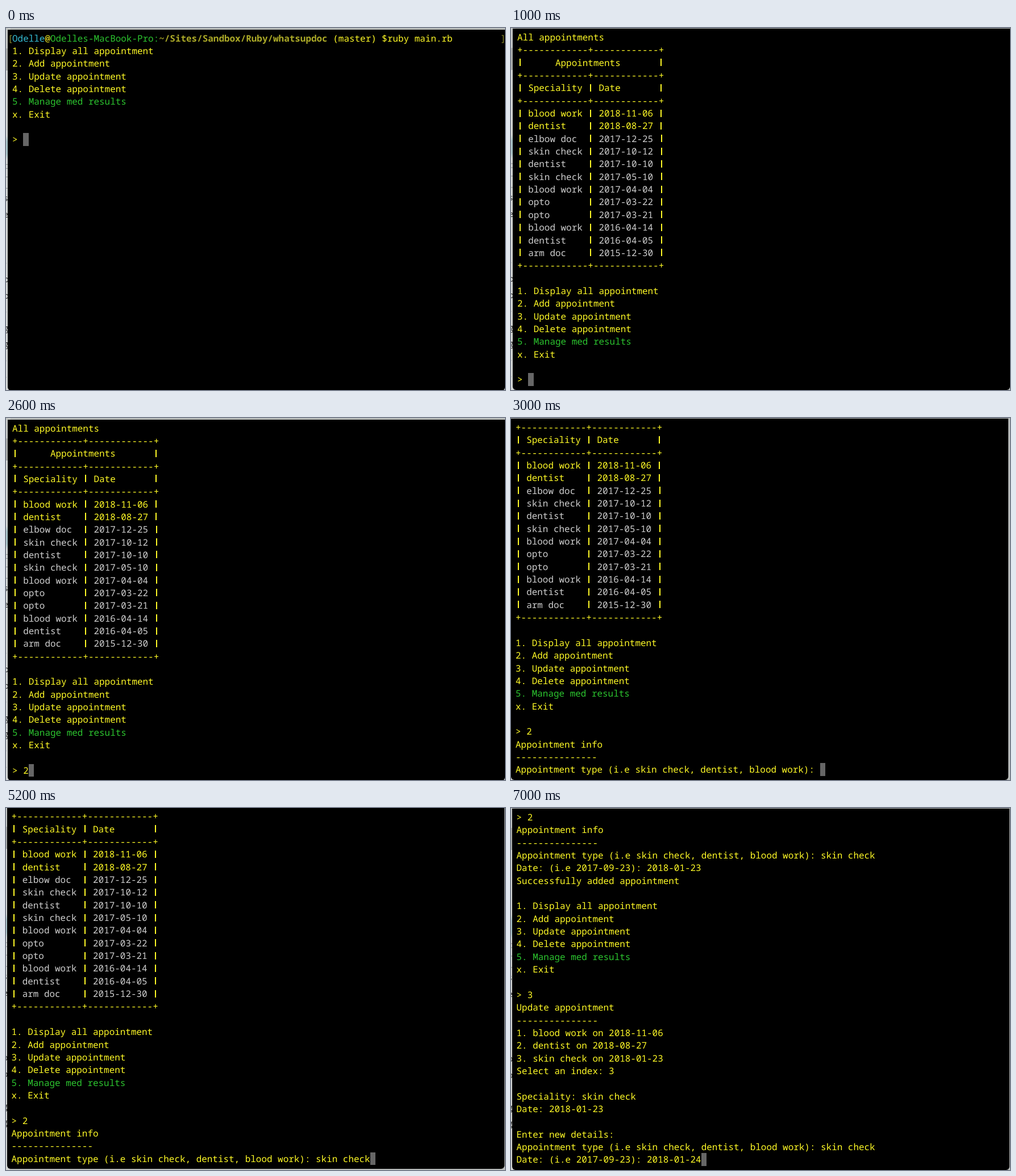
An HTML page for the animation above (8 s loop, 878 by 638 pixels).

```html
<!DOCTYPE html>
<html lang="en">
<head>
<meta charset="utf-8">
<title>Appointment terminal</title>
<style>
html, body { margin: 0; width: 100%; height: 100%; overflow: hidden; }
#stage { position: relative; width: 878px; height: 638px; overflow: hidden; background: #b9bcbb; }
#desk { position: absolute; left: 0; top: 0; width: 8px; height: 642px;
  background: linear-gradient(#c4c7c6 36px, #a9acab 36px 75px, #d3d6d5 75px 190px, #a9c3c8 200px 222px, #d3d6d5 232px); }
#desk span { position: absolute; left: -4px; font: 15px/20px "Open Sans", sans-serif; color: #222; }
#desk hr { position: absolute; left: 0; width: 8px; height: 1px; margin: 0; border: 0; background: #8d9090; }
#win { position: absolute; width: 875px; height: 636.5px; background: #000; border-radius: 0 0 6px 6px; }
pre { position: absolute; left: 8px; top: 4px; margin: 0; color: #fffa26;
  font: 500 15.95px/22.35px "Noto Sans Mono", monospace; text-rendering: geometricPrecision; }
.green { color: #2cc52f; }
.cyan { color: #35bcd4; }
.gray { color: #cfcfcf; }
.path { color: #acaa28; font-weight: 700; }
.mark { position: absolute; top: 0; color: #8b8a2c; font-weight: 400; }
.bar { -webkit-text-fill-color: transparent;
  background: linear-gradient(currentColor, currentColor) center / 2px 13px no-repeat; }
.cursor { display: inline-block; vertical-align: top; width: 9.57px; height: 22.35px; background: #666; }
</style>
</head>
<body>
<div id="stage">
  <div id="desk"></div>
  <div id="win"><pre id="text"></pre></div>
</div>
<script>
const $ = id => document.getElementById(id);
const tint = (name, s) => `<span class="${name}">${s}</span>`;
const mark = (s, x) => `<span class="mark" style="left:${x}px">${s}</span>`;
const rule = `+${"-".repeat(12)}+${"-".repeat(12)}+`;
const dashes = "-".repeat(15);

const shell = mark("[", -8) + mark("]", 859) +
  tint("cyan", "Odelle") + "@" + tint("green", "Odelles-MacBook-Pro:") +
  tint("path", "~/Sites/Sandbox/Ruby/whatsupdoc") + " (master) $ruby main.rb";

const menu = ["1. Display all appointment", "2. Add appointment", "3. Update appointment",
  "4. Delete appointment", tint("green", "5. Manage med results"), "x. Exit", ""];

const visits = `blood work 2018-11-06,dentist 2018-08-27,elbow doc 2017-12-25,skin check 2017-10-12,
dentist 2017-10-10,skin check 2017-05-10,blood work 2017-04-04,opto 2017-03-22,opto 2017-03-21,
blood work 2016-04-14,dentist 2016-04-05,arm doc 2015-12-30`.split(/,\s*/);

const bar = tint("bar", "|");
const row = (a, b, past) => {
  const cell = s => past ? tint("gray", s.padEnd(10)) : s.padEnd(10);
  return `${bar} ${cell(a)} ${bar} ${cell(b)} ${bar}`;
};
const rows = visits.map((v, i) => row(v.slice(0, -11), v.slice(-10), i > 1));

const list = ["All appointments", rule, `${bar}      Appointments       ${bar}`, rule,
  row("Speciality", "Date"), rule, ...rows, rule, "", ...menu];
const askType = "Appointment type (i.e skin check, dentist, blood work): ";
const askDate = "Date: (i.e 2017-09-23): ";
const adding = [...list, "&gt; 2", "Appointment info", dashes];
const typed = [...adding, askType + "skin check"];
const updating = [...typed, askDate + "2018-01-23", "Successfully added appointment", "", ...menu,
  "&gt; 3", "Update appointment", dashes,
  "1. blood work on 2018-11-06", "2. dentist on 2018-08-27", "3. skin check on 2018-01-23",
  "Select an index: 3", "", "Speciality: skin check", "Date: 2018-01-23", "",
  "Enter new details:", askType + "skin check"];

// start time, window left, window top, log, line being typed
const scenes = [
  [0, 3, 2.5, [shell, ...menu], "&gt; "],
  [1000, 3, 1, list, "&gt; "],
  [2000, 3, 2.5, list, "&gt; 2"],
  [3000, 0, 1, adding, askType],
  [4000, 1.5, -0.7, adding, askType + "skin check"],
  [6000, 1.5, -0.7, typed, askDate + "2018-01-23"],
  [7000, 1.5, 1, updating, askDate + "2018-01-24"]
];

$("desk").innerHTML =
  [..."se((-oo-gg--"].map((c, i) => `<span style="top:${289 + i * 28.6}px">${c}</span>`).join("") +
  [240, 247, 262, 282].map(y => `<hr style="top:${y}px">`).join("");

let shown;
function draw() {
  const t = performance.now() % 8000;
  const scene = scenes.findLast(s => s[0] <= t);
  if (scene !== shown) {
    shown = scene;
    const [, x, y, log, input] = scene;
    $("win").style.left = x + "px";
    $("win").style.top = y + "px";
    $("desk").style.transform = `translate(${x - 3}px, ${y - 2.5}px)`;
    $("text").innerHTML = [...log, input + tint("cursor", "")].slice(-28).join("\n");
  }
  requestAnimationFrame(draw);
}
draw();
</script>
</body>
</html>
```
